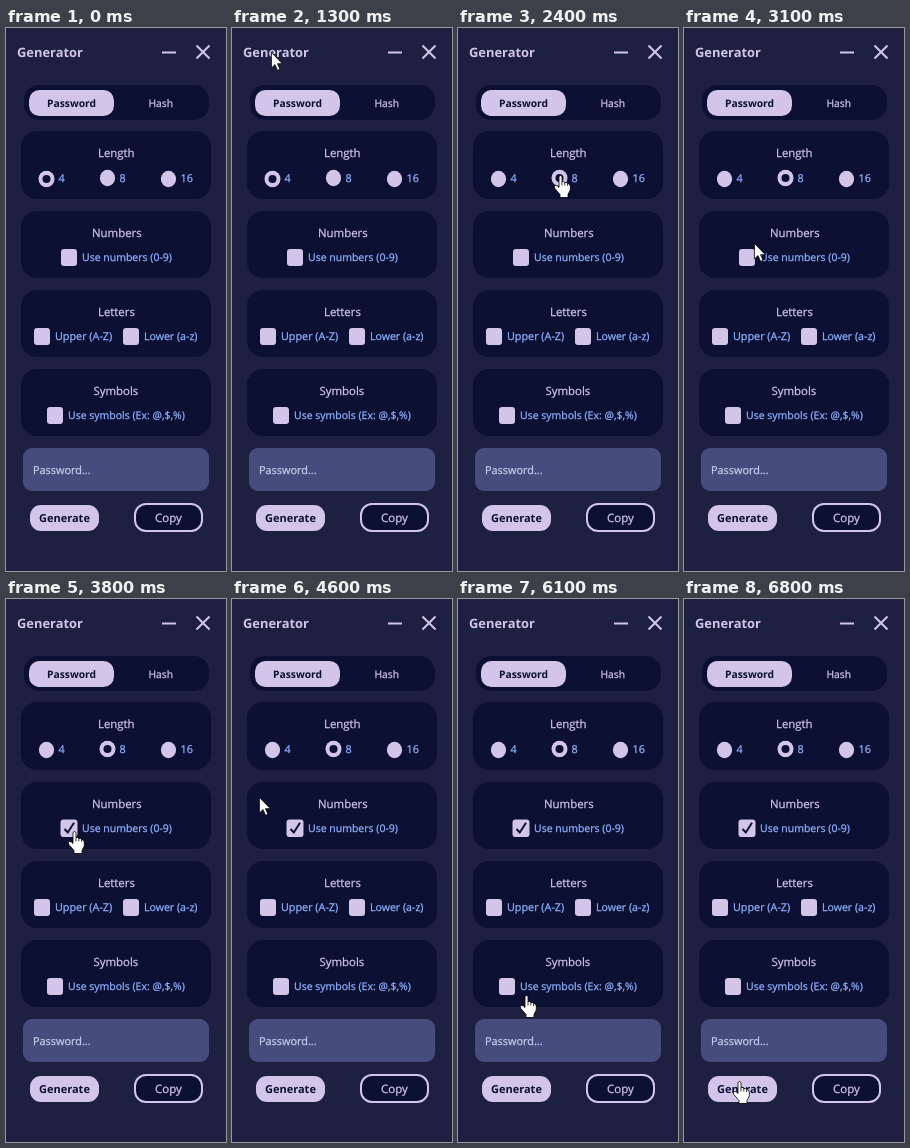
Animation of 220x543 px, one loop 8000 ms. Source, as an HTML page:

```html
<!DOCTYPE html>
<html lang="en">
<head>
<meta charset="utf-8">
<title>Generator</title>
<style>
  html, body { margin: 0; width: 100%; height: 100%; overflow: hidden; background: #1e2041; }
  svg { display: block; width: 100%; height: 100%; }
  text { font-family: "Open Sans", "Noto Sans", sans-serif; text-rendering: geometricPrecision; stroke-width: .25; }
  .bold { font-weight: 700; stroke: none; }
  .line { fill: none; stroke: #d2c5e8; stroke-width: 2; }
  .cursor { fill: #fff; stroke: #000; stroke-width: .8; stroke-linejoin: round; }
</style>
</head>
<body>
<svg id="stage" viewBox="0 0 220 543"></svg>
<script>
const LOOP = 8000, TICK = 100;
const DARK = '#0c1033', LILAC = '#d2c5e8', BLUE = '#8fb2ff';
const stage = document.getElementById('stage');

function add(tag, attributes, content = '') {
  const node = document.createElementNS('http://www.w3.org/2000/svg', tag);
  for (const key in attributes) node.setAttribute(key, attributes[key]);
  node.textContent = content;
  return stage.appendChild(node);
}
const box = (x, y, width, height, rx, fill) => add('rect', { x, y, width, height, rx, fill });
const label = (content, x, y, size, fill, weight = '') =>
  add('text', { x, y, 'font-size': size, fill, stroke: fill, class: weight }, content);
const path = (d, className) => add('path', { d, class: className });

// Each control returns the marks that appear only while it is selected.
function radio(content, x, y) {
  add('ellipse', { cx: x, cy: y, rx: 7.6, ry: 8.2, fill: LILAC });
  label(content, x + 12, 154, 10.8, BLUE);
  return [
    add('circle', { cx: x, cy: y, r: 8, fill: LILAC }),
    add('circle', { cx: x, cy: y, r: 4, fill: DARK })
  ];
}
function checkbox(content, x, y, size) {
  box(x, y, 16, 17, 3, LILAC);
  label(content, x + 21, y + 12, size, BLUE);
  return [
    box(x - .5, y - .5, 17, 17.5, 3, LILAC),
    add('path', {
      d: `M${x + 3.5} ${y + 9}l3.3 3.5l6.2-9.7`, fill: 'none', stroke: DARK, 'stroke-width': 2
    })
  ];
}
function card(title, x, y, height) {
  box(15, y, 190, height, 16, DARK);
  label(title, x, y + 26, 11.4, LILAC);
}

box(0, 0, 220, 543, 0, '#1e2041');
label('Generator', 11, 28.5, 12.9, LILAC, 'bold');
path('M156 24.5H170M190.5 17.5L203.5 30.5M203.5 17.5L190.5 30.5', 'line');

box(18, 57, 185, 35, 15, DARK);
box(23, 62, 85, 26, 10.5, LILAC);
label('Password', 41, 79, 10.3, DARK, 'bold');
label('Hash', 142.5, 79, 10.3, LILAC);

card('Length', 92, 103, 68);
const four = radio('4', 40.5, 151);
const eight = radio('8', 101.5, 150);
const sixteen = radio('16', 162.5, 151);

card('Numbers', 86, 183, 67);
const numbers = checkbox('Use numbers (0-9)', 55, 221, 10.5);

card('Letters', 92, 262, 67);
const upper = checkbox('Upper (A-Z)', 28, 300, 10.8);
const lower = checkbox('Lower (a-z)', 117, 300, 10.6);

card('Symbols', 87.5, 341, 67);
const symbols = checkbox('Use symbols (Ex: @,$,%)', 41, 379, 10.5);

box(17, 420, 186, 43, 9, '#464d7d');
label('Password...', 27, 446, 10.9, '#c5cdee');
box(24, 477, 69, 26, 11, LILAC);
label('Generate', 33, 494, 11, DARK, 'bold');
add('rect', { x: 129, y: 476, width: 67, height: 27, rx: 11, class: 'line', style: `fill:${DARK}` });
label('Copy', 149, 494, 11.5, LILAC);

const pointers = {
  arrow: path('M.4.4V16L4 12.6L6.6 18.4L9 17.3L6.5 11.7H11.4Z', 'cursor'),
  hand: path('M5 1.5Q6.5-.5 8 1.5V6.5Q9.8 6 10.8 7.5Q12.6 7 13.6 8.5Q16 8.3 16.3 11V15L14 19.5V22.5H6V19.5L.8 13.5Q-.3 11 1.5 10.5Q3.3 10.3 5 12.5ZM8 6.5V10.5M10.8 7.5V10.5M13.6 8.5V11', 'cursor')
};

const linear = p => p;
const smooth = p => p * p * (3 - 2 * p);
const easeOut = p => 1 - (1 - p) ** 2;

// First step, last step, pointer shape, end position, easing
const moves = [
  [1200, 1700, 'arrow', 85, 151, smooth],
  [1800, 1800, 'hand', 96, 149, linear],
  [1900, 1900, 'hand', 96, 147, linear],
  [3000, 3100, 'arrow', 70, 215, linear],
  [3200, 3200, 'hand', 67, 237, linear],
  [3400, 3400, 'hand', 62, 232, linear],
  [4300, 4600, 'arrow', 27, 198, easeOut],
  [5100, 5100, 'arrow', 26, 204, linear],
  [5300, 5500, 'arrow', 58, 351, easeOut],
  [5700, 5700, 'arrow', 54, 351, linear],
  [6100, 6100, 'hand', 62, 396, linear],
  [6200, 6500, 'arrow', 60, 474, smooth],
  [6600, 6600, 'hand', 56, 482, linear],
  [6800, 6800, 'hand', 49, 482, linear]
];

function cursorAt(time) {
  let x = 23, y = -20, shape = '';
  for (const [start, end, kind, endX, endY, ease] of moves) {
    if (time < start) break;
    const p = ease(Math.min(1, (time - start + TICK) / (end - start + TICK)));
    x += (endX - x) * p;
    y += (endY - y) * p;
    shape = kind;
  }
  return { x: Math.round(x), y: Math.round(y), shape };
}

const show = (node, visible) => node.setAttribute('visibility', visible ? 'visible' : 'hidden');
const select = (marks, selected) => marks.forEach(mark => show(mark, selected));
[sixteen, upper, lower, symbols].forEach(marks => select(marks, false));

function draw(now) {
  const time = Math.floor(now % LOOP / TICK) * TICK;
  select(four, time < 2300);
  select(eight, time >= 2300);
  select(numbers, time >= 3800);

  const { x, y, shape } = cursorAt(time);
  for (const kind in pointers) {
    show(pointers[kind], kind === shape);
    pointers[kind].setAttribute('transform', `translate(${x} ${y})`);
  }
}

const began = performance.now();
function frame() {
  draw(performance.now() - began);
  requestAnimationFrame(frame);
}
frame();
</script>
</body>
</html>
```
